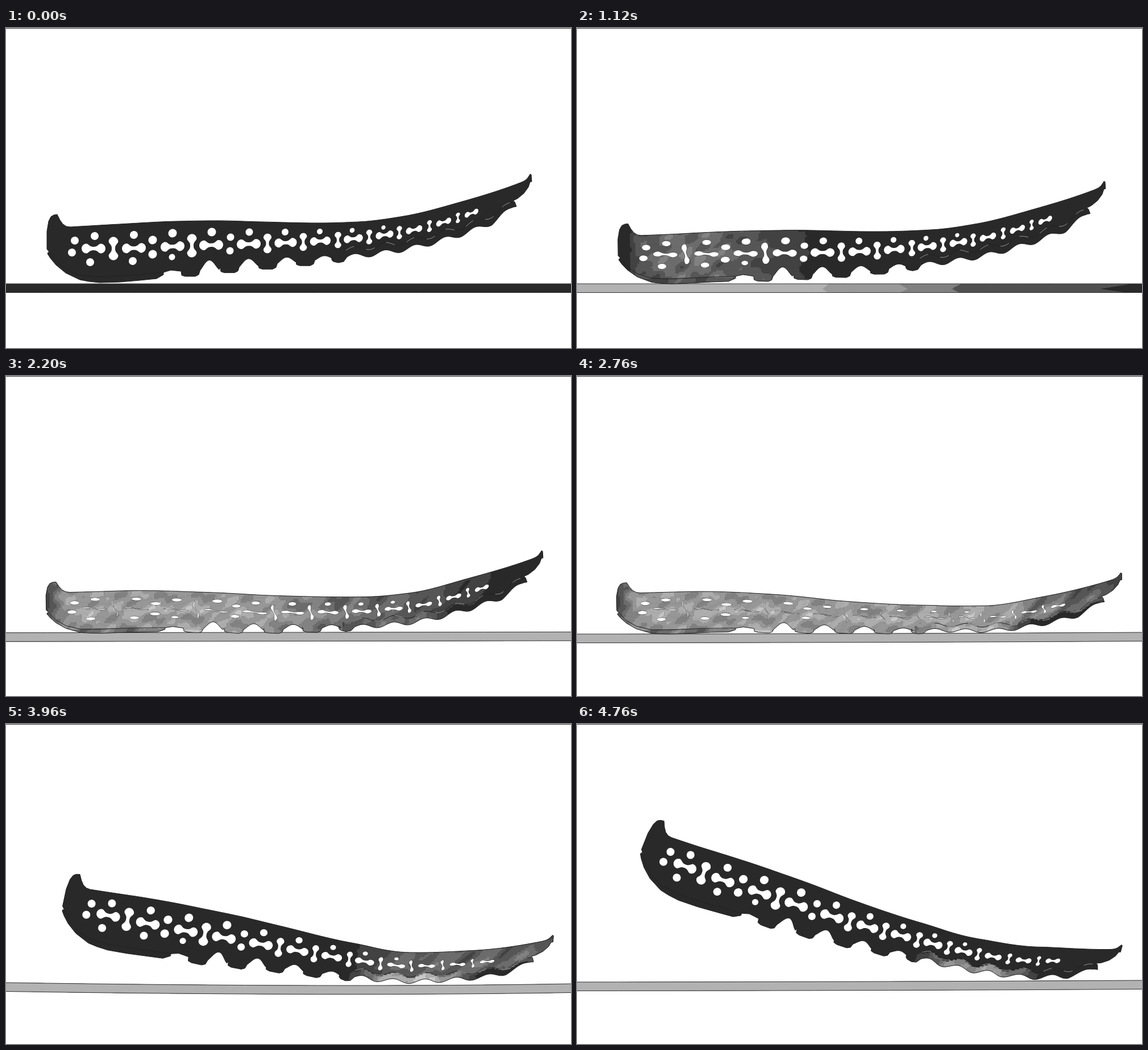
Recreate the animation shown at these times as an HTML page with a canvas. Size 994 by 563 pixels, loop 4800 ms.

```html
<!DOCTYPE html>
<html lang="en">
<head>
<meta charset="utf-8">
<title>Sole rolling over the ground</title>
<style>
html, body { margin: 0; width: 100%; height: 100%; overflow: hidden; background: #fff; }
canvas { display: block; }
</style>
</head>
<body>
<canvas id="stage" width="994" height="563"></canvas>
<script>
const ctx = document.getElementById('stage').getContext('2d');
const LOOP = 4800, STEP = 40, S0 = 65, S1 = 930, PIVOT = 460;
const DARK = '#292929', LINE = '#222';
const SHADES = [DARK, '#424242', '#565656', '#6c6c6c', '#828282', '#979797', '#adadad', '#c8c8c8', '#e8e8e8'];
const clamp = (v, lo, hi) => Math.max(lo, Math.min(hi, v));

// Monotone cubic through the given points.
function spline(xs, ys) {
  const last = xs.length - 1;
  const slope = i => (ys[i + 1] - ys[i]) / (xs[i + 1] - xs[i]);
  const tangent = xs.map((_, i) => {
    if (i === 0) return slope(0);
    if (i === last) return slope(last - 1);
    const a = slope(i - 1), b = slope(i);
    return a * b <= 0 ? 0 : 2 * a * b / (a + b);
  });
  return x => {
    let i = 0;
    while (i < last - 1 && x > xs[i + 1]) i++;
    const h = xs[i + 1] - xs[i], u = (x - xs[i]) / h, v = 1 - u;
    return v * v * (1 + 2 * u) * ys[i] + u * u * (3 - 2 * u) * ys[i + 1]
      + h * u * v * (v * tangent[i] - u * tangent[i + 1]);
  };
}

// Midline height and thickness at the stations, for each key time.
const stations = [S0, 190, 327, 460, 584, 692, 795, S1];
const times = [0, 600, 1640, 2760, 3520, 3960, 4760];
const midline = [
  [388, 388, 383, 379, 373, 360, 334, 280],
  [390, 390, 386, 384, 378, 366, 341, 288],
  [409, 406, 407, 406, 399, 383, 354, 299],
  [412, 410, 414, 422, 425, 425, 410, 368],
  [360, 378, 399, 416, 423, 427, 423, 394],
  [318, 344, 370, 393, 414, 426, 421, 393],
  [217, 263, 307, 348, 380, 405, 417, 412]];
const full = Array(8).fill(1);
const thickness = [full, full,
  [.85, .72, .8, .94, 1, 1, 1, 1],
  [.82, .72, .7, .68, .72, .76, .85, .93],
  [1, 1, 1, .92, .74, .72, .75, .8],
  [1, 1, 1, .98, .96, .88, .88, .9],
  [1, 1, 1, 1, 1, .98, .97, .97]];
const columns = rows => rows[0].map((_, i) => spline(times, rows.map(r => r[i])));
const midAt = columns(midline), thickAt = columns(thickness);
const groundAt = columns([[450, 450, 450], [450, 450, 450], [450, 450, 450],
  [454, 453, 451], [455, 459, 456], [455, 460, 457], [454, 453, 451]]);
const pivotAt = spline(times, [460, 460.5, 470, 472, 467, 481, 480]);
const treadStress = spline(times, [0, 0, 0, 6, 6.5, 6, 4.5]);
const treadCentre = spline(times, [660, 660, 660, 662, 700, 698, 695]);

const restMid = spline(stations, midline[0]);
let pose;

function makePose(t) {
  const y = spline(stations, midAt.map(f => f(t)));
  const k = spline(stations, thickAt.map(f => f(t)));
  const p = { x: [0], y: [], k: [], turn: [] };
  for (let s = S0; s <= S1; s++) {
    const dy = y(s + 1) - y(s), rest = restMid(s + 1) - restMid(s), i = s - S0;
    p.y.push(y(s));
    p.k.push(k(s));
    const length = Math.hypot(1, rest) * (1 + .13 * Math.max(0, 1 - k(s)));
    const dx = Math.sqrt(length * length - dy * dy);
    p.x[i + 1] = p.x[i] + dx;
    p.turn.push(Math.atan2(dy, dx) - Math.atan2(rest, 1));
  }
  const shift = pivotAt(t) - p.x[PIVOT - S0];
  p.x = p.x.map(x => x + shift);
  return p;
}

// Station s and offset d from the midline, to stage coordinates.
function place(s, d) {
  const u = clamp(s - S0, 0, S1 - S0 - 1), i = Math.floor(u), f = u - i;
  const r = d * pose.k[i], a = pose.turn[i];
  return [pose.x[i] + f * (pose.x[i + 1] - pose.x[i]) - r * Math.sin(a),
    pose.y[i] + f * (pose.y[i + 1] - pose.y[i]) + r * Math.cos(a)];
}

function trace(points, close = true) {
  const path = new Path2D();
  for (const [s, d] of points) path.lineTo(...place(s, d));
  if (close) path.closePath();
  return path;
}

const ripple = s => 4.3 * Math.cos((s - 640) * 2 * Math.PI / 53);
const seam = s => 18 + ripple(s);

// Silhouette in (station, offset) form.
const outline = [];
const add = (x, y) => outline.push([x, y - restMid(x)]);
const addAll = list => list.forEach(p => add(...p));
addAll([[76, 394], [72, 389], [72, 358], [75, 340], [79, 332], [84, 329], [90, 328], [95, 338], [100, 345], [106, 349]]);
const topEdge = spline([113, 200, 300, 370, 450, 550, 620, 700, 800, 900, 915, 921],
  [350, 345, 340, 339, 341, 343, 341, 331, 306, 274, 267, 259]);
for (let x = 113; x <= 921; x += 4) add(x, topEdge(x));
addAll([[922, 257], [924, 258], [925, 270], [922, 271], [919, 280], [911, 291], [900, 300], [892, 304], [895, 306], [898, 314], [893, 315]]);
for (let s = 888; s > 598; s -= 3) outline.push([s, 31 + ripple(s) - Math.max(0, s - 855) * .3]);
addAll([[594, 411], [585, 413], [576, 411], [573, 408], [573, 402]]);
for (const c of [526, 460, 393, 324]) {
  const low = 437 - (c - 324) * .093, depth = 18 - .055 * (c - 324);
  for (let u = 1; u >= 0; u -= .08)
    add(c + 16 + 35 * u, low - 9 - 3 * u - depth * Math.sin(Math.PI * u) ** 1.3);
  addAll([[c + 15, low - 3], [c + 9, low], [c - 9, low], [c - 15, low - 2], [c - 16, low - 9]]);
}
addAll([[299, 427], [290, 426], [280, 429], [277, 430], [277, 434], [265, 441], [235, 444], [200, 447], [165, 448],
  [146, 446], [130, 443], [105, 431], [88, 417], [78, 405], [73, 397], [74, 395]]);

const heelSeam = [[77, 396], [88, 411], [105, 425], [130, 435], [165, 438], [220, 435], [277, 430]]
  .map(([x, y]) => [x, y - restMid(x)]);
const treadSeam = [];
for (let s = 598; s < 893; s += 3) treadSeam.push([s, seam(s) - Math.max(0, s - 855) * .2]);

const dots = [[121, 374, 7], [116, 395, 7], [156, 366, 7], [148, 412, 7], [225, 364, 7], [223, 410, 7],
  [258, 373, 7.5], [258, 398, 7.5], [293, 361, 7.5], [292, 403, 5.5], [362, 359, 7.5], [395, 368, 6.5],
  [394, 392, 6.5], [428, 359, 6.5], [491, 359, 6], [552, 358, 5], [609, 356, 4.3], [664, 351, 3.7]];
const flatBones = [154, 225, 293, 361, 427, 492, 553, 611, 666, 718, 770, 819];
const tallBones = [189, 327, 460, 523, 584, 639, 692, 745, 795];

const openness = s => clamp(1 - 3.3 * (1 - pose.k[Math.round(s) - S0]), .07, 1);

function dotShape([x, y, r]) {
  const q = .45 + .55 * openness(x), d = y - restMid(x), points = [];
  for (let a = 0; a < 6.28; a += .3)
    points.push([x + r * (1.25 - .25 * q) * Math.cos(a), d + r * q * Math.sin(a)]);
  return trace(points);
}

function boneShape(s, tall) {
  const half = tall ? 20.5 - Math.max(0, s - 330) * .0245 : 21 - Math.max(0, s - 430) * .023;
  const r = half * .41, core = half - r, q = openness(s), points = [];
  const width = a => {
    const m = Math.abs(a);
    if (m > core) return Math.sqrt(Math.max(0, r * r - (m - core) ** 2));
    return r * (.36 + .32 * (1 - Math.cos(Math.PI * (m / core) ** 1.5)));
  };
  const steps = 36;
  for (let i = 0; i < 2 * steps; i++) {
    const side = i < steps ? 1 : -1;
    const a = -half * Math.cos(Math.PI * i / steps);
    const wave = (1 - q) * Math.sin(2.4 * a / half);
    const b = side * width(a) * q + wave * (tall ? 5 : 2.5);
    points.push(tall ? [s + b, a] : [s + a, b]);
  }
  return trace(points);
}

// Fixed mottling of the stress field.
const CELL = 3, grain = new Map();
const key = (s, d) => s * 200 + d;
for (let d = -63; d <= 66; d += CELL)
  for (let s = 66; s <= 927; s += CELL)
    grain.set(key(s, d), .6 * Math.sin(s * .088 + 1.5 * Math.sin(d * .09))
      + .5 * Math.sin(d * .13 + s * .05 + 2 * Math.sin(s * .031))
      + .4 * Math.sin(s * .21 + d * .17)
      + 1.7 * Math.exp(-(((d - 2) / 10) ** 2)) * (.5 + .5 * Math.sin(s * .0924 + 2)));

function stressLevel(s, d, t) {
  const noise = grain.get(key(s, d));
  let level;
  if (s > 578 && d > seam(s)) {
    level = treadStress(t) * Math.exp(-(((s - treadCentre(t)) / 85) ** 4));
  } else {
    level = clamp(26 * (.97 - pose.k[s - S0]), 0, 5);
    if (d > 47) level *= s < 285 ? .65 : 1.25;
    level -= Math.max(0, 104 - s) * .09;
  }
  return clamp(Math.round(level + noise * clamp(level / 3, 0, 1)), 0, 8);
}

// Each row is painted as runs of equal shade.
function paintStress(t) {
  for (let d = -63; d <= 66; d += CELL) {
    let start = 66, level = stressLevel(start, d, t);
    for (let s = 69; s <= 927; s += CELL) {
      const next = s === 927 ? -1 : stressLevel(s, d, t);
      if (next === level) continue;
      if (level > 0) {
        const upper = [], lower = [];
        for (let x = start; x <= s; x += CELL) {
          upper.push([x, d]);
          lower.unshift([x, d + CELL + .7]);
        }
        ctx.fillStyle = SHADES[level];
        ctx.fill(trace(upper.concat(lower)));
      }
      start = s;
      level = next;
    }
  }
}

function drawGround(t) {
  const [left, mid, right] = groundAt.map(f => f(t));
  const bend = 2 * mid - (left + right) / 2;
  const bar = new Path2D();
  bar.moveTo(-2, left);
  bar.quadraticCurveTo(600, bend, 996, right);
  bar.lineTo(996, right + 15.5);
  bar.quadraticCurveTo(600, bend + 15.5, -2, left + 15.5);
  bar.closePath();
  ctx.fillStyle = DARK;
  ctx.fill(bar);
  ctx.save();
  ctx.clip(bar);
  // Half width at 600 ms, growth power, notch depth, shade.
  for (const [size, power, notch, shade] of [[315, 1.5, 50, '#505050'], [95, 2.6, -16, '#686868'],
    [78, 3, 16, '#808080'], [48, 3.4, -14, '#999'], [20, 4.2, 10, '#b2b2b2']]) {
    const w = Math.min(1300, size * (t / 600) ** power), n = Math.min(w, Math.abs(notch)) * Math.sign(notch);
    ctx.fillStyle = shade;
    ctx.beginPath();
    for (const [x, y] of [[-w, 440], [w, 440], [w, 451], [w - n, 459], [w, 466], [w, 490], [-w, 490], [-w, 466], [n - w, 459], [-w, 451]])
      ctx.lineTo(167 + x, y);
    ctx.fill();
  }
  ctx.restore();
  ctx.strokeStyle = '#333';
  ctx.stroke(bar);
}

function draw(t) {
  pose = makePose(t);
  ctx.fillStyle = '#fff';
  ctx.fillRect(0, 0, 994, 563);
  ctx.fillStyle = '#333';
  ctx.fillRect(0, 0, 994, 1);
  ctx.lineWidth = 1;
  drawGround(t);

  const body = trace(outline);
  ctx.fillStyle = DARK;
  ctx.fill(body);
  ctx.save();
  ctx.clip(body);
  paintStress(t);
  ctx.restore();
  ctx.strokeStyle = LINE;
  ctx.stroke(body);
  ctx.stroke(trace(heelSeam, false));

  const tread = trace(treadSeam, false);
  ctx.stroke(tread);
  ctx.lineWidth = .6;
  ctx.strokeStyle = '#ddd';
  ctx.setLineDash([16, 22]);
  ctx.stroke(tread);
  ctx.setLineDash([]);

  ctx.lineWidth = .9;
  ctx.strokeStyle = LINE;
  ctx.fillStyle = '#fff';
  const holes = [...dots.map(dotShape), ...flatBones.map(s => boneShape(s, false)), ...tallBones.map(s => boneShape(s, true))];
  for (const hole of holes) {
    ctx.stroke(hole);
    ctx.fill(hole);
  }
}

let shown = -1;
function tick() {
  const t = Math.floor(performance.now() % LOOP / STEP) * STEP;
  if (t !== shown) draw(shown = t);
  requestAnimationFrame(tick);
}
tick();
</script>
</body>
</html>
```
